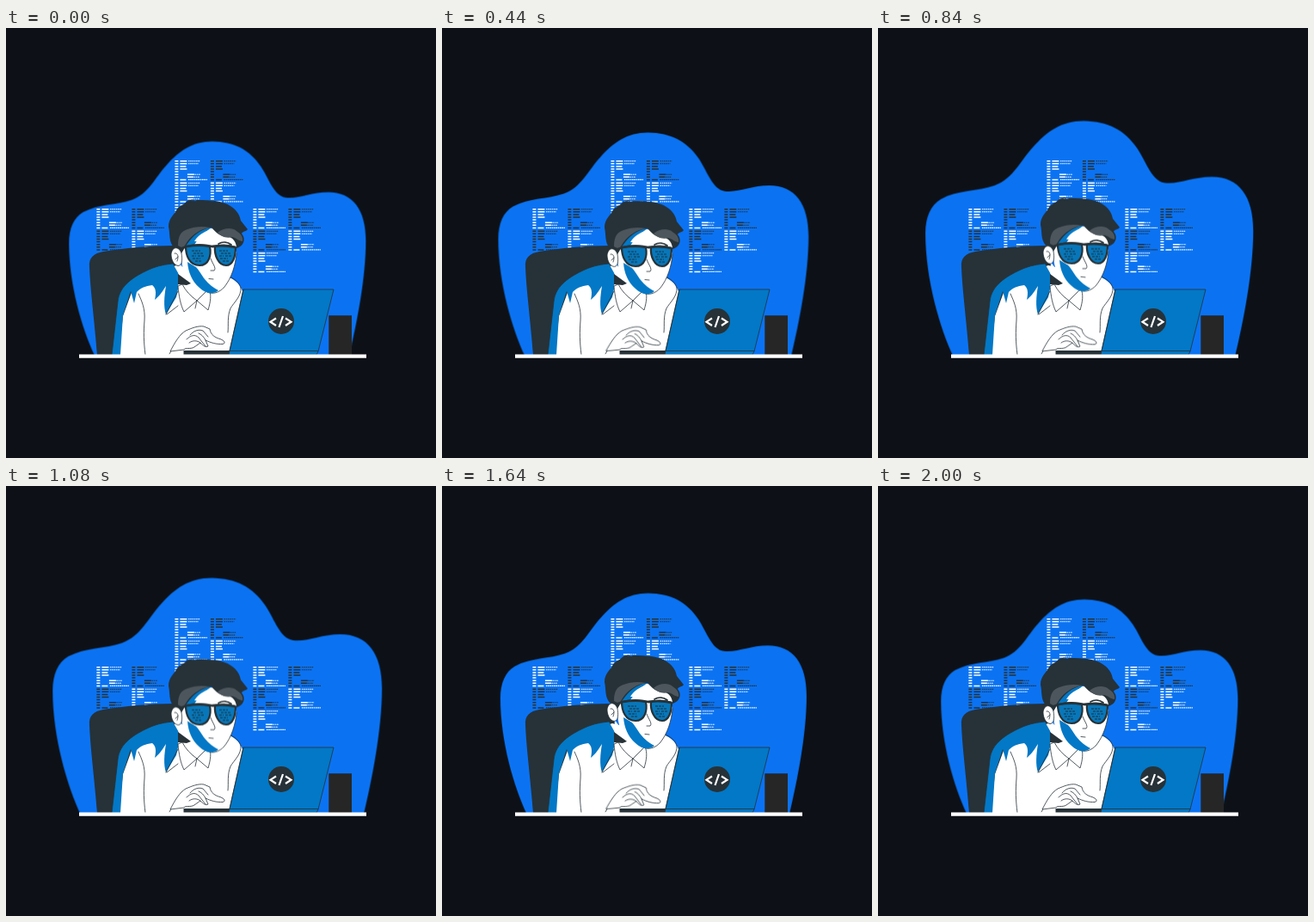
Animation, 500 px wide and 500 px high, one loop 2.04 s. Source, as an HTML page without scripts:

```html
<!DOCTYPE html>
<html lang="en">
<head>
<meta charset="utf-8">
<title>Coder at a desk</title>
<style>
  html, body { margin: 0; width: 100%; height: 100%; overflow: hidden; background: #0d1117; }
  svg { display: block; width: 100vw; height: 100vh; }
  .ink { fill: #263238; }
  .grey { fill: #4d565c; }
  .blue { fill: #0378c6; }
  .white { fill: #fff; }
  .line { fill: none; stroke: #263238; stroke-width: .8; stroke-linecap: round; stroke-linejoin: round; }
  .edge { stroke: #263238; stroke-width: .8; stroke-linejoin: round; }
  .light { color: #fff; }
  .dark { color: #263238; }
  .blob { fill: #0b73f2; transform-origin: 247px 360px; animation: swell 2040ms infinite; }
  .head { animation: nod 2040ms linear infinite; }
  .fingers { transform-origin: 205px 362px; animation: tap 2040ms ease-in-out infinite; }
  @keyframes swell {
    0%, 98.04% { transform: scale(.9); animation-timing-function: cubic-bezier(.37, 0, .63, 1); }
    49.02% { transform: scale(1); animation-timing-function: cubic-bezier(.37, 0, .63, 1); }
    100% { transform: scale(.9); }
  }
  @keyframes nod {
    0%, 98.04%, 100% { transform: translateY(0); }
    7% { transform: translateY(2.1px); }
    12.25% { transform: translateY(3px); }
    17.5% { transform: translateY(2.3px); }
    24.5% { transform: translateY(.3px); }
    29.4% { transform: translateY(-.8px); }
    36.8% { transform: translateY(-3px); }
    43% { transform: translateY(-2px); }
    49% { transform: translateY(0); }
    53% { transform: translateY(1.4px); }
    61.25% { transform: translateY(3px); }
    66.7% { transform: translateY(2.4px); }
    73.5% { transform: translateY(-.2px); }
    80.4% { transform: translateY(-3px); }
    85.8% { transform: translateY(-3px); }
    92% { transform: translateY(-1.8px); }
  }
  @keyframes tap {
    0%, 49%, 60%, 98.04%, 100% { transform: rotate(0); }
    14%, 29%, 80% { transform: rotate(1.6deg); }
  }
</style>
</head>
<body>
<svg viewBox="0 0 500 500" role="img" aria-label="Coder typing on a laptop">
  <defs>
    <g id="code" fill="none" stroke="currentColor" stroke-width="1.5">
      <path d="M0 .9h4M0 4h4M0 7.1h4M0 10.2h4M0 13.3h4M0 16.4h4M0 19.5h4M0 22.6h4"/>
      <path d="M6 .9h8M6 4h8M6 7.1h7M6 10.2h8M14.500 16.4h8M14.500 19.5h7M6 22.6h7"/>
      <path stroke-width="1.1" stroke-dasharray="1.6 .7" d="M15.500 .9h14M15.500 4h12M23 16.4h7M22 19.5h7M15.500 22.6h22"/>
    </g>
    <g id="lens-code" fill="none" stroke="#14303f" stroke-width="1" stroke-dasharray="3 1">
      <path d="M0 0h10M2 3h12M0 6h5M7 6h8M1 9h9M4 12h8"/>
    </g>
  </defs>

  <path class="blob" d="M87 383C71 349 54 292 54 238C54 219 60 205 72 198C92 187 115 189 135 182C157 174 165 153 180 137C196 119 213 106.500 239 106.500C268 107 287 117 302 139C313 156 319 177 334 179C351 181 366 172 389 172C421 172 437.500 195 437.500 235C437.500 283 426 341 416 383Z"/>

  <g transform="translate(.4 .8)">
    <g class="light">
      <use href="#code" x="196" y="153"/>
      <use href="#code" x="196" y="178.500"/>
      <use href="#code" x="196" y="204"/>
      <use href="#code" x="237.500" y="178.500"/>
      <use href="#code" x="105" y="209"/>
      <use href="#code" x="146" y="234.500"/>
      <use href="#code" x="287" y="209"/>
      <use href="#code" x="328" y="234.500"/>
      <use href="#code" x="287" y="260"/>
    </g>
    <g class="dark">
      <use href="#code" x="237.500" y="153"/>
      <use href="#code" x="146" y="209"/>
      <use href="#code" x="105" y="234.500"/>
      <use href="#code" x="328" y="209"/>
      <use href="#code" x="287" y="234.500"/>
    </g>
  </g>

  <!-- chair -->
  <path class="ink" d="M106 380C103 342 98 304 97 278C96 267 102 262 113 260C139 256 165 253 196 253L205 300L150 380Z"/>

  <!-- body -->
  <path class="white" d="M131 380L136 335L148 302C160 289 178 283 198 276L238 286C255 286 267 292 272 300L277 310L262 380Z"/>
  <path class="blue" d="M123 380L130 318C132 299 149 289 166 281C177 276 186 275 194 274L203 290L198 313L186 333C183 324 184 312 186 300C181 308 177 313 173 316C175 307 174 302 170 299C162 300 157 302 152 307L149 320L145 306L136 334L133 380Z"/>
  <path class="line" d="M123 380L130 318C132 299 149 289 166 281C177 276 186 275 194 274M162 380C160 364 160 354 161 340C162 326 158 318 154 309M186 333L200 306M250 286C262 289 270 293 273 302M273 302C274 312 265 319 261 326C257 336 259 345 258 354M190 379C195 370 199 364 205 359"/>
  <path class="white" d="M201 272L218 297L240 298L236 309L211 320L200 305Z"/>
  <path class="ink" d="M200 286L215 297L210 299L200 298Z"/>
  <path class="white edge" d="M200 300C201 312 203 322 207 330L222 317C215 312 209 306 205 298ZM222 317L235 328C238 318 239 310 236 303C231 308 227 312 222 317Z"/>
  <path class="line" d="M222 317L220 326M187 333L200 323"/>

  <!-- head -->
  <g class="head">
    <path class="white" d="M205 232L268 234L268 262C267 276 262 291 254 301C248 308 240 310 234 307C225 302 215 296 209 288C205 281 204 272 204 262Z"/>
    <path class="line" d="M268 262C267 276 262 291 254 301C248 308 240 310 234 307"/>
    <path class="blue" d="M206 256L211 242L224 233L240 231L226 242L216 256ZM211 272L221 278C227 284 230 296 247 305C240 311 231 308 225 302C216 294 212 284 211 272Z"/>
    <path class="ink" d="M195 255C189 248 191 240 189 231C189 221 195 218 198 212C201 206 207 206 210 202C214 198 218 203 222 200C239 200 253 201 261 207C267 211 271 215 273 224L281 234C279 237 275 236 274 239C279 245 277 253 268 256C268 250 265 245 260 243C251 244 244 238 239 232C229 233 220 239 213 248C209 253 207 257 204 262Z"/>
    <path class="grey" d="M200 253C200 241 204 236 211 234C219 231 228 230 237 232C226 234 218 239 211 248L206 256ZM246 238C252 233 262 231 268 236C273 239 276 243 275 248C271 248 268 244 263 243C256 245 250 242 246 238Z"/>
    <path class="white" d="M219 248C223 241 230 237 238 234C235 240 230 244 225 248Z"/>
    <path class="line" d="M202 213C206 204 212 199 216 203M210 207C213 199 218 198 220 202"/>
    <path class="white edge" d="M204 262C201 253 193 254 192 263C192 271 197 278 202 276C205 274 205 268 204 262Z"/>
    <path class="line" d="M196 262C200 261 201 266 199 271M197 269L200 266"/>
    <path class="line" style="stroke-width:1.8" d="M247 251C252 248 258 249 262 252"/>
    <path fill="#0877ba" stroke="#263238" stroke-width="2.2" stroke-linejoin="round" d="M209 254C218 252 229 252 237 254C239 264 236 276 225 276C213 276 209 264 209 254ZM243 254C250 252 259 252 267 255C267 265 264 276 256 276C247 276 242 264 243 254Z"/>
    <path fill="none" stroke="#263238" stroke-width="2.8" d="M202 257L210 254Q225 251 240 254Q254 252 267 255"/>
    <use href="#lens-code" x="216" y="259"/>
    <use href="#lens-code" x="248" y="259"/>
    <path class="line" d="M238 268C240 274 245 279 242 282L238 282M236 291.500L241 292"/>
  </g>

  <!-- desk -->
  <path fill="#262626" d="M375.300 334.300H402V380H375.300Z"/>
  <path class="ink" d="M206.500 375H262V380.500H206.500Z"/>
  <g class="fingers">
    <path class="white edge" d="M191 376C196 366 202 356 209 352C216 349 223 346 230 347L237 350C238 357 243 360 250 362C255 364 255 367 252 367.500C245 368 238 366 232 363L235 370C232 372 229 369 226 366L219 371C214 374 209 371 207 374Z"/>
    <path class="line" d="M214 357C218 352 224 350 229 352L235 359M210 362C215 357 220 356 224 360L232 370M226 366C222 363 217 363 213 366M232 363C230 359 227 356 224 355"/>
  </g>
  <path class="blue edge" d="M276 304H381L363 376L361 380H259L260 375Z"/>
  <path class="line" d="M276 304L260 375.500H363"/>
  <circle class="ink" cx="320" cy="341" r="15"/>
  <path fill="none" stroke="#fff" stroke-width="2.2" d="M314 337.500L307.500 341.700L314 346M325 337.500L331.500 341.700L325 346M322 335L317.500 348"/>
  <path class="white" d="M85 379.500H419V383.700H85Z"/>
</svg>
</body>
</html>
```
